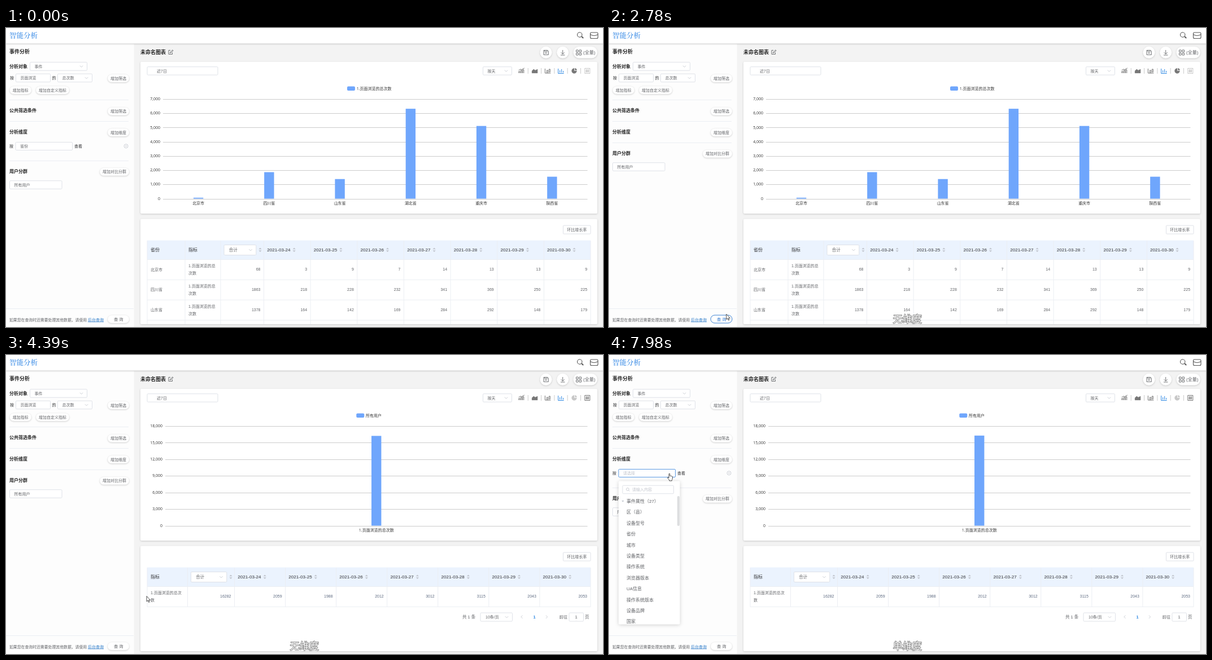
An HTML page that plays this animation: 1057 by 530 pixels, repeating every 8 s.

```html
<!DOCTYPE html>
<html lang="zh">
<head>
<meta charset="utf-8">
<title>智能分析</title>
<style>
html, body { margin: 0; width: 100%; height: 100%; overflow: hidden; background: #f3f3f3; }
svg { display: block; width: 1057px; height: 530px; }
text { font-family: "Liberation Sans", "Noto Sans CJK SC", "Noto Sans CJK", sans-serif; fill: #606266; white-space: pre; }
.chart text { font-family: "Open Sans", "Noto Sans CJK SC", "Noto Sans CJK", sans-serif; fill: #333; }
.brand { font-family: "Noto Serif CJK SC", "Noto Sans CJK SC", serif; font-weight: 700; fill: #69a7ec; }
.b { font-weight: 700; fill: #222; }
.d { fill: #303133; }
.ph { fill: #c0c4cc; }
.link { fill: #2878c8; text-decoration: underline; }
.pill rect { fill: #fff; stroke: #f0f0f0; stroke-width: .6; filter: drop-shadow(0 1px 1px rgba(0,0,0,.16)); }
.pill.on rect { stroke: #3c82d2; stroke-width: 1; filter: none; }
.pill.on text { fill: #3179d0; }
.box { fill: #fff; stroke: #dcdfe6; stroke-width: .9; }
.card { fill: #fff; filter: drop-shadow(0 1px 1.5px rgba(0,0,0,.17)); }
.line { stroke: #ebeef3; stroke-width: 1; fill: none; }
.grid { stroke: #ccc; stroke-width: 1; }
.ic { fill: none; stroke: #606266; stroke-width: .9; }
.chev { fill: none; stroke: #c0c4cc; stroke-width: .8; }
.cap text { font-weight: 500; fill: #fff; stroke: #777; stroke-width: 1.5; paint-order: stroke; }
</style>
</head>
<body>
<svg id="stage" viewBox="0 0 1057 530"></svg>
<script>
const LOOP = 8000, BLUE = '#6fa6fc';
const range = n => [...Array(n).keys()];
const each = (list, fn) => list.map(fn).join('');

// Text is placed by its vertical centre.
const text = (x, y, s, size = 7, cls = '', anchor = 'start') =>
  `<text x="${x}" y="${y + size * .37}" font-size="${size}" class="${cls}" text-anchor="${anchor}">${s}</text>`;
const rect = (x, y, w, h, cls = 'box', rx = 1.5) =>
  `<rect x="${x}" y="${y}" width="${w}" height="${h}" rx="${rx}" class="${cls}"/>`;
const path = (d, cls = 'ic', extra = '') => `<path d="${d}" class="${cls}" ${extra}/>`;
const group = (id, body, cls = '') => `<g id="${id}" class="${cls}">${body}</g>`;
const chevron = (x, y) => path(`M${x - 2.7} ${y - 1.3}l2.7 2.7 2.7-2.7`, 'chev');
const field = (x, y, w, s, cls = '', h = 14.5, pad = 8) =>
  rect(x, y - h / 2, w, h) + text(x + pad, y, s, 7, cls);
const select = (x, y, w, s, h, pad) => field(x, y, w, s, '', h, pad) + chevron(x + w - 10, y);
const pill = (x, y, w, s, id = '') =>
  `<g class="pill" ${id && `id="${id}"`}>${rect(x, y - 7, w, 14, '', 7)}${text(x + w / 2, y, s, 7, '', 'middle')}</g>`;
const rule = y => path(`M6 ${y}H217`, 'line');
const sorter = (x, y) =>
  `<path d="M${x - 2.6} ${y - 1}l2.6-2.8 2.6 2.8zM${x - 2.6} ${y + 1}l2.6 2.8 2.6-2.8z" fill="#c0c4cc"/>`;

function header() {
  return '<rect width="1057" height="27.5" fill="#fff" style="filter:drop-shadow(0 1px 1px rgba(0,0,0,.2))"/>'
    + text(6, 13, '智能分析', 12.5, 'brand')
    + '<g stroke-width="1.1" stroke="#555" fill="none"><circle cx="1015.7" cy="12" r="4.2"/>'
    + '<path d="M1019 15l3.2 3" stroke-width="1.8"/><rect x="1034.5" y="8" width="13.5" height="10.5" rx="2"/>'
    + '<path d="M1034.5 11.5q6.7 4 13.5 0"/></g>';
}

function sidebar() {
  return '<rect y="28" width="226.5" height="502" fill="#fdfdfd"/>'
    + text(6, 42, '事件分析', 9, 'b')
    + text(6, 68, '分析对象', 8, 'b') + select(42.5, 68, 101, '事件')
    + text(7, 88.5, '按', 7, 'd') + field(17.5, 88.5, 61, '页面浏览')
    + text(81.5, 88.5, '的', 7, 'd') + select(91.5, 88.5, 61, '总次数')
    + pill(180, 89, 38, '增加筛选') + pill(6.5, 110, 38.5, '增加指标') + pill(53, 110, 59, '增加自定义指标')
    + rule(127.5) + text(6, 146.5, '公共筛选条件', 8, 'b') + pill(180, 147.5, 38, '增加筛选')
    + rule(165.5) + text(6, 184.5, '分析维度', 8, 'b') + pill(180, 185, 38, '增加维度', 'addDim')
    + group('dim', text(6, 209.5, '按', 7, 'd')
      + '<rect id="dimBox" x="17" y="202.5" width="100.5" height="14" rx="1.5" class="box"/>'
      + '<text id="dimText" x="25" y="212.1" font-size="7"></text>'
      + text(121, 209.5, '查看', 7, 'd')
      + '<g id="remove" fill="none" stroke="#c0c4cc" stroke-width=".8"><circle cx="212.5" cy="209.3" r="3.5"/>'
      + '<path d="M211.2 208l2.6 2.6m0-2.6l-2.6 2.6"/></g>')
    + group('crowd', rule(203.5) + text(6, 222, '用户分群', 8, 'b')
      + pill(166, 222.8, 52, '增加对比分群') + field(6.5, 246, 92.5, '所有用户'))
    + path('M0 497.5H226', 'line')
    + text(6, 517, '如果您在查询时还需要处理其他数据，请使用', 6.87) + text(145, 517, '后台查询', 7, 'link')
    + '<g id="query" class="pill">' + rect(180, 509, 38, 14, '', 7)
    + '<circle id="busy" cx="188.5" cy="516" r="2" fill="none" stroke="#5b96dc" stroke-width=".9" stroke-dasharray="2.4 .75"/>'
    + '<g id="queryText">' + text(191, 516, '查 询', 7.3) + '</g></g>';
}

function toolbar() {
  const icons = [
    'M-5 4V1h2v3M-1.5 4V-1h2v5M2 4V-2h2v6M-5-1l3-2 2 1 5-3',
    'M-5 4V0l3-3 3 2 4-2v7z',
    'M-5-4v8h10M-2 4V-1h2v5M2 2v-5h2v5z',
    'M-5-4v8.5h10M-2 3V-1M1 3v-6M4 3V0',
    'M0-4.5a4.5 4.5 0 1 0 4.5 4.5H0z M1.3-4.7v3.5h3.4a4 4 0 0 0-3.4-3.5z',
    'M-4.5-4.5h9v9h-9zM-1.3-3l-.6 6M1.7-3l-.6 6M-3-1h6M-3 1.4h6'];
  const solid = { 1: '#777', 4: '#777' };
  return text(238, 43, '未命名图表', 9, 'b')
    + path('M291 39.5h-3v7h6.5v-3M290.5 44.3l.4-1.7 4-3.7 1.1 1.2-3.9 3.8z')
    + '<circle cx="956" cy="43.3" r="10.5" class="card"/><circle cx="985.7" cy="43.3" r="10.5" class="card"/>'
    + rect(1004.5, 33, 42.5, 20.5, 'card', 10)
    + path('M952 39.5h7l1.3 1.3v6.7h-8.3zM954 39.5v2.5h4v-2.5M954 44.5h4M985.7 39v7m-3-2.7l3 3 3-3M982 48h7.5')
    + path('M1009.5 39h3.5v3.5h-3.5zM1015 39h3.5v3.5h-3.5zM1009.5 44.5h3.5v3.5h-3.5zM1015 44.5h3.5v3.5h-3.5z')
    + text(1022, 43.3, '(全量)', 8)
    + rect(238, 60, 809, 269, 'card', 2) + rect(238, 338.5, 809, 186.5, 'card', 2)
    + field(250, 76, 125, '近7日', '', 14.5, 17) + select(844.5, 76, 51, '按天')
    + each(icons, (d, i) => {
      const color = i == 3 ? '#2b87e3' : solid[i] || '#777';
      return `<path id="kind${i}" d="${d}" transform="translate(${912.8 + i * 23.3} 76)" fill="${solid[i] ? color : 'none'}" stroke="${color}" stroke-width="${solid[i] ? .3 : 1}"/>`;
    })
    + each(range(5), i => path(`M${924.3 + i * 23.3} 71v10`, 'grid'))
    + rect(986.5, 350, 48.5, 15, 'box', 1) + text(1010.7, 357.5, '环比增长率', 7, '', 'middle');
}

const BASE = 302.5, SPAN = 176.5;
function chart(id, left, top, step, legendX, legend, names, values) {
  const n = top / step, slot = (1029.5 - left) / names.length;
  const axis = each(range(n + 1), i => {
    const y = BASE - SPAN * i / n;
    return path(`M${left} ${Math.round(y) + .5}H1029.5`, 'grid')
      + text(left - 5, y - .5, (i * step).toLocaleString('en-US'), 7, '', 'end');
  });
  const bars = each(values, (v, i) => {
    const h = SPAN * v / top, x = left + slot * (i + .5);
    return `<rect class="bar" x="${x - 8.7}" y="${BASE - h}" width="17.4" height="${h}" fill="${BLUE}"/>`
      + text(x, 310.3, names[i], 7, '', 'middle');
  });
  return group(id, rect(legendX, 103.5, 14, 7.6, '', 2).replace('/>', ` fill="${BLUE}"/>`)
    + text(legendX + 16.7, 107, legend) + axis + bars, 'chart');
}

// cols: column edges; first: number of leading text columns.
function table(id, cols, first, rows, tint) {
  const last = 250 + 785, bottom = first == 2 ? 525 : 446.5;
  const heads = ['省份', '指标'].slice(2 - first);
  const sumX = cols[first], sumEnd = cols[first + 1];
  return group(id, `<rect x="250" y="376.5" width="785" height="34" fill="#ebf3fe"/>`
    + each(cols, x => path(`M${x} 377V${bottom}`, 'line'))
    + each(range(rows.length + 1), i => path(`M250 ${410.5 + i * 35.8}H${last}`, 'line'))
    + each(heads, (s, i) => text(cols[i] + 6, 393.5, s, 8, 'd'))
    + rect(sumX + 6, 384.5, sumEnd - sumX - 19.7, 18) + text(sumX + 14.8, 393.5, '合计', 7.5)
    + chevron(sumEnd - 23.5, 393.5) + sorter(sumEnd - 6.5, 393.3)
    + each(range(7), i => {
      const x = cols[first + 1 + i];
      return text(x + 5.7, 393.5, '2021-03-' + (24 + i), 8.1, 'd') + sorter(x + 53.7, 393.3);
    })
    + each(rows, (r, i) => {
      const y = 428 + i * 35.8, metric = '1.页面浏览的总次数', cut = first == 2 ? 8 : 9;
      const mx = cols[first - 1] + 6;
      return (first == 2 ? text(256, y, r[0]) : '')
        + text(mx, y - 6.5, metric.slice(0, cut)) + text(mx, y + 6.5, metric.slice(cut))
        + `<g style="--c:${tint}">` + each(r.slice(1), (v, k) =>
          text(cols[first + 1 + k] - 6, y - .3, v, 7, '', 'end').replace('<text', `<text style="fill:${tint}"`)) + '</g>';
    })
    + (first == 1 ? pager() : ''));
}

const pager = () => text(808, 464, '共 1 条', 7.5) + select(840, 464.5, 56.5, '10条/页', 15, 9)
  + path('M914.5 461.5l-2.6 2.7 2.6 2.7M956 461.5l2.6 2.7-2.6 2.7', 'chev')
  + '<text x="935.6" y="467" font-size="7.5" font-weight="700" text-anchor="middle" style="fill:#2b87e3">1</text>'
  + text(979.5, 464.5, '前往', 7.3) + rect(997, 457, 25.5, 15) + text(1009.7, 464.5, '1', 7.5, '', 'middle')
  + text(1025, 464.5, '页', 7.5);

function loader() {
  return group('loading', '<rect x="226.5" y="28.5" width="831" height="502" fill="#f4f4f4"/>'
    + each(range(8), i => `<circle class="dot" cx="${642.3 + 15.2 * Math.cos(i * Math.PI / 4)}" cy="${263.8 + 15.2 * Math.sin(i * Math.PI / 4)}" fill="#136ee0"/>`)
    + text(642.3, 296, '努力查询中...', 8, 'd', 'middle')
    + '<rect x="528.5" y="309.5" width="228" height="8.5" rx="4.2" fill="#e8eaee"/>'
    + '<text x="531" y="316.2" font-size="7" style="fill:#fff">0%</text>');
}

function dropdown() {
  const items = ['事件属性（27）', '区（县）', '设备型号', '省份', '城市', '设备类型', '操作系统',
    '浏览器版本', 'UA信息', '操作系统版本', '设备品牌', '国家'];
  return '<clipPath id="panel"><rect x="17" y="223" width="109" height="255"/></clipPath>'
    + group('menu', '<rect x="17" y="223.5" width="108.5" height="254" rx="2" fill="#fff" style="filter:drop-shadow(0 1px 3px rgba(0,0,0,.18))"/>'
      + '<g clip-path="url(#panel)">' + field(24, 238.5, 90.5, '请输入内容', 'ph', 14.5, 17)
      + '<circle cx="33" cy="238" r="2.4" class="chev"/>' + path('M34.8 239.8l1.7 1.7', 'chev')
      + '<path d="M22.3 258h4.4l-2.2 2.6z" fill="#c0c4cc"/>'
      + each(items, (s, i) => text(31, 259 + i * 19.4, s, 8)) + '</g>'
      + '<rect x="120.8" y="250" width="4.2" height="53" rx="2.1" fill="#dddee0"/>');
}

const cursors = '<g id="cursor" fill="#fff" stroke="#222" stroke-width=".8" stroke-linejoin="round">'
  + '<path id="arrow" d="M0 0V9.4L2.2 7.5 3.7 10.9 5.2 10.2 3.7 7H6.7Z"/>'
  + '<path id="hand" d="M2.5 7V1.2q.9-1.2 1.8 0V5q.9-.8 1.6.1.9-.6 1.5.3 1-.4 1.4.6V9.500q0 1.600-1 2.500V13.500H3.300V12.200L.3 8.600Q-.2 7.200 1.200 7.200L2.500 8.500Z"/></g>';

const regions = ['北京市', '四川省', '山东省', '湖北省', '重庆市', '陕西省'];
const byRegion = [
  ['北京市', 68, 3, 9, 7, 14, 13, 13, 9],
  ['四川省', 1863, 218, 228, 232, 341, 369, 250, 225],
  ['山东省', 1378, 164, 142, 169, 284, 292, 148, 179]];
const total = [['', 16282, 2059, 1988, 2012, 3012, 3115, 2043, 2053]];

document.getElementById('stage').innerHTML = '<rect width="1057" height="530" fill="#f3f3f3"/>'
  + toolbar()
  + chart('chartA', 278, 7000, 1000, 604, '1.页面浏览的总次数', regions, [68, 1863, 1378, 6320, 5110, 1543])
  + chart('chartB', 282, 18000, 3000, 620.3, '所有用户', ['1.页面浏览的总次数'], [16282])
  + table('tableA', [250, 317, 380, ...range(8).map(i => 456.5 + i * 82.65)], 2, byRegion, '#606266')
  + table('tableB', [250, 321.5, ...range(8).map(i => 404.5 + i * 90.07)], 1, total, '#5d6a80')
  + loader() + sidebar() + header() + dropdown()
  + '<g class="cap"><text id="caption" x="528.3" y="522" font-size="17" text-anchor="middle"></text></g>'
  + cursors;

const $ = id => document.getElementById(id);
const show = (id, on) => { $(id).style.display = on ? '' : 'none'; };
const within = (t, a, b) => t >= a && t < b;
const clamp = v => Math.min(1, Math.max(0, v));
const dots = [...document.querySelectorAll('.dot')];
const growing = document.querySelector('#chartB .bar');

const easeOut = p => 1 - (1 - p) ** 2;
// time, x, y, easing towards this point
const track = [
  [50, 1019, 519], [700, 192, 223, easeOut], [830, 203, 219], [1180, 212, 206, easeOut],
  [1810, 212, 205], [1840, 214, 206], [2080, 214, 209], [2170, 215, 247.5], [2500, 211, 445],
  [2870, 207.5, 511, easeOut], [3740, 207.5, 511], [4390, 249, 427.5, easeOut], [5400, 249, 427.5],
  [5401, 1014, 511], [5690, 175.5, 220.5, easeOut], [5750, 173, 219], [6160, 196, 184, easeOut],
  [6720, 196, 184], [6930, 127, 203], [7170, 103.5, 209.5, easeOut], [LOOP, 103.5, 209.5]];

function place(t) {
  const k = Math.max(1, track.findIndex(p => p[0] > t));
  const [t0, x0, y0] = track[k - 1], [t1, x1, y1, ease = p => p] = track[k];
  const p = ease(clamp((t - t0) / (t1 - t0)));
  return [x0 + (x1 - x0) * p, y0 + (y1 - y0) * p];
}

function draw(t) {
  const loading = within(t, 2920, 3540), result = t >= 3540, picking = t >= 6230;
  const hasDim = t < 1825 || picking, open = t >= 7500;

  show('loading', loading);
  for (const [id, on] of [['chartA', !result], ['tableA', !result], ['chartB', result], ['tableB', result]]) show(id, on);
  $('kind4').setAttribute('opacity', result ? .4 : 1);
  $('kind5').setAttribute('opacity', result ? 1 : .4);

  const h = SPAN * 16282 / 18000 * (1 - (1 - clamp((t - 3540) / 1000)) ** 3);
  growing.setAttribute('y', BASE - h);
  growing.setAttribute('height', h);

  const phase = Math.PI / 2 + (t - 3080) / 1200 * Math.PI * 2;
  dots.forEach((d, i) => {
    const c = Math.cos(i * Math.PI / 4 - phase);
    d.setAttribute('r', Math.max(0, 1.1 + 3.6 * c - 1.1 * c * c));
  });

  show('dim', hasDim);
  $('crowd').setAttribute('transform', `translate(0 ${hasDim ? 32 : 0})`);
  $('dimText').textContent = picking ? '请选择' : '省份';
  $('dimText').setAttribute('class', picking ? 'ph' : '');
  $('dimBox').style.stroke = open ? '#4a8fe0' : '';
  $('remove').setAttribute('stroke', within(t, 1650, 1825) ? '#909399' : '#c0c4cc');
  $('addDim').classList.toggle('on', within(t, 6050, 7500));
  $('query').classList.toggle('on', within(t, 2760, 3850));
  show('busy', loading);
  $('busy').setAttribute('transform', `rotate(${t * .2} 188.5 516)`);
  $('queryText').setAttribute('transform', `translate(${loading ? 5.5 : 0} 0)`);

  show('menu', open);
  const p = 1 - (1 - clamp((t - 7500) / 300)) ** 4;
  $('menu').setAttribute('transform', `translate(0 223) scale(1 ${p}) translate(0 -223)`);
  $('menu').setAttribute('opacity', p);

  $('caption').textContent = within(t, 2110, 5240) ? '无维度' : t >= 5800 ? '单维度' : '';

  const hand = within(t, 1650, 1825) || within(t, 5640, 6720) || t >= 7130;
  show('cursor', within(t, 50, 4570) || t >= 5401);
  show('arrow', !hand);
  show('hand', hand);
  $('cursor').setAttribute('transform', `translate(${place(t)})`);
}

const start = performance.now();
function tick() {
  draw((performance.now() - start) % LOOP);
  requestAnimationFrame(tick);
}
tick();
</script>
</body>
</html>
```
